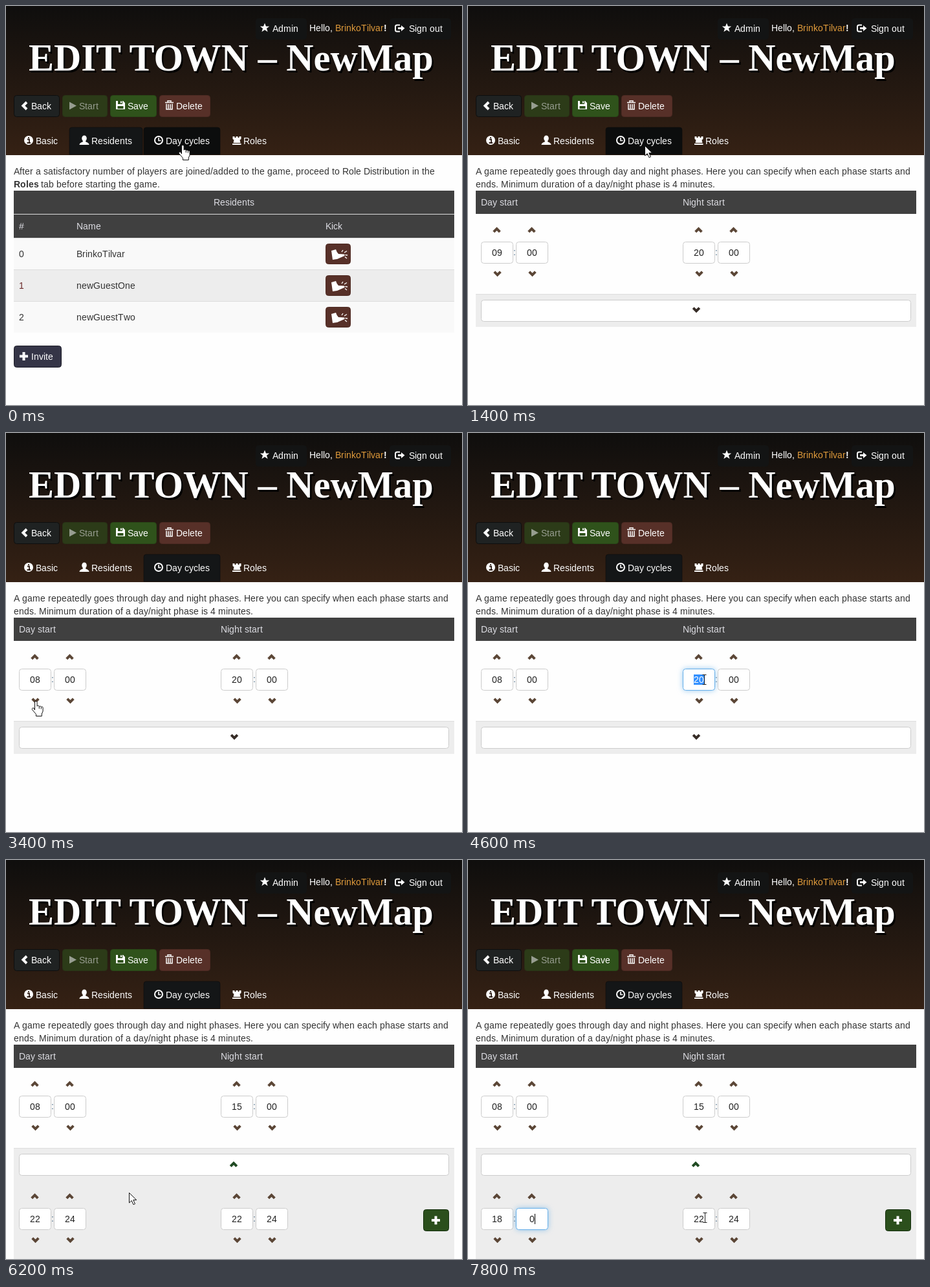
Write an HTML page that moves like this. It is 705 px wide and 618 px high and loops after 8000 ms.

```html
<!DOCTYPE html>
<html lang="en">
<head>
<meta charset="utf-8">
<title>Edit town</title>
<style>
  html, body { margin: 0; width: 100%; height: 100%; overflow: hidden; background: #fefefe; }
  svg { display: block; font: 14px "Liberation Sans", Arial, sans-serif; }
  .title { font: bold 58.5px "Liberation Serif", "Times New Roman", serif; }
  .focus { stroke: #66afe9; filter: drop-shadow(0 0 4px rgba(102, 175, 233, .65)); }
</style>
</head>
<body>
<svg id="stage" width="705" height="618" viewBox="0 0 705 618"></svg>
<script>
const LOOP = 8000, STEP = 200;
const stage = document.getElementById('stage');
const pen = document.createElement('canvas').getContext('2d');

// Text is laid out on whole-pixel advances.
const advance = (c, bold) => {
  pen.font = `${bold ? 'bold ' : ''}14px "Liberation Sans", Arial, sans-serif`;
  return Math.round(pen.measureText(c).width);
};
const textWidth = s => [...s].reduce((w, c) => w + advance(c), 0);

function text(x, y, s, fill = '#333', bold = false) {
  const xs = [...s].map(c => { const at = x; x += advance(c, bold); return at; });
  return `<text x="${xs.join(' ')}" y="${y}" fill="${fill}"${bold ? ' font-weight="bold"' : ''}>${s}</text>`;
}
const rect = (x, y, w, h, fill, more = '') =>
  `<rect x="${x}" y="${y}" width="${w}" height="${h}" fill="${fill}" ${more}/>`;
const button = (x, y, w, h, fill, stroke = fill) =>
  rect(x + .5, y + .5, w - 1, h - 1, fill, `rx="4" stroke="${stroke}"`);
const shape = (d, fill = '#fff', more = '') => `<path d="${d}" fill="${fill}" ${more}/>`;
const line = (d, stroke = '#fff', width = 2) =>
  `<path d="${d}" fill="none" stroke="${stroke}" stroke-width="${width}"/>`;
const at = (x, y, body) => `<g transform="translate(${x} ${y})">${body}</g>`;
const chevron = (x, y, dir, color) =>
  line(`M${x - 4.8} ${y + 2.4 * dir}l4.8 ${-4.8 * dir} 4.8 ${4.8 * dir}`, color, 4);
const plus = (x, y) => line(`M${x - 6.5} ${y}h13M${x} ${y - 6.5}v13`, '#fff', 4);

function tab(x, w, fill) {
  return shape(`M${x} 230v-38q0-4 4-4h${w - 8}q4 0 4 4v38z`, fill, 'stroke="#0b0b0b" stroke-width=".6"');
}

function title() {
  const s = 'EDIT TOWN – NewMap';
  return `<g class="title"><text x="37.5" y="102.5" fill="#000">${s}</text>
    <text x="35" y="100" fill="#fff">${s}</text></g>`;
}

function header(s) {
  const white = '#fff';
  return rect(0, 0, 705, 231, 'url(#sky)') + title()
    + button(386, 19, 79, 33, '#131414')
    + shape('M400 26.5l2 5h5.2l-4.2 3.3 1.6 5.2-4.6-3.1-4.6 3.1 1.6-5.2-4.2-3.3h5.2z')
    + text(412, 40, 'Admin', white)
    + text(469, 39, 'Hello,', white) + text(509, 39, 'BrinkoTilvar', '#df9a3b') + text(584, 39, '!', white, true)
    + button(593, 19, 95, 33, '#131414')
    + line('M609 29.5h-4.5q-2.5 0-2.5 2.5v5q0 2.5 2.5 2.5h4.5')
    + shape('M606 33h5v-3l5.5 4.5-5.5 4.5v-3h-5z')
    + text(623, 40, 'Sign out', white)

    + button(12, 138, 71, 34, '#1f2222', '#0d0e0e')
    + line('M32 149l-5.6 5.5 5.6 5.5', white, 4) + text(39, 160, 'Back', white)
    + button(87, 138, 70, 34, '#2c3b18', '#283416')
    + shape('M98 148.5l11 6-11 6z', '#979d90') + text(113, 160, 'Start', '#979d90')
    + button(161, 138, 72, 34, '#2f521b', '#284717')
    + shape('M170 147h11l3 3v10h-14zM173 147v5h7v-5zM172.5 155v4h9v-4z', white, 'fill-rule="evenodd"')
    + rect(177, 147.5, 2, 3, white) + text(188, 160, 'Save', white)
    + button(237, 138, 79, 34, '#573028', '#4d2a23')
    + line('M246 149.5h13M250 148.5v-1.5h5v1.5', white, 1.6)
    + line('M248 151.5v8.5h9v-8.5M251 152v7M254 152v7', white, 1.5) + text(263, 160, 'Delete', white)

    + (s.tab ? '' : tab(98, 113, '#141617')) + tab(213, 118, s.hover ? '#0c0d0d' : '#141617')
    + '<circle cx="35" cy="208" r="7" fill="#fff"/>'
    + line('M33 206.5h3v5M32.5 212h5.5M34 203.8h2', '#2c1c13', 1.8) + text(46, 214, 'Basic', white)
    + '<ellipse cx="121" cy="205" rx="3.8" ry="4.6" fill="#fff"/>'
    + shape('M113.5 215q0-3 5-4.5l1-3h3l1 3q5 1.500 5 4.500z') + text(132, 214, 'Residents', white)
    + '<circle cx="236" cy="208" r="6" fill="none" stroke="#fff" stroke-width="2"/>'
    + line('M236 204v4.500h3.500', white, 1.6) + text(247, 214, 'Day cycles', white)
    + shape('M350.500 202h3v2h2v-2h3v2h2v-2h3v4l-2 1.500 1 4.500h-11l1-4.500-2-1.500zM350 213h13.500v2h-13.500z')
    + text(367, 214, 'Roles', white);
}

const foot = shape('M9 11l7-2q1.500 5 4 7l9 .5q2 2.500-2 3.500l-9 4-7 1q-1-7-2-14z')
  + line('M25 13l2-3M29 14l4-2.500M30.500 17.500l3.500.5M30 20.500l3 2.500', '#fff', 1.3);

function residents() {
  const pale = '#dcdce2';
  const row = (name, i) => {
    const y = 359 + 49 * i;
    return rect(12, y, 681, 49, i % 2 ? '#ededed' : '#f9f9f9') + rect(12, y, 681, 1, '#ddd')
      + text(20, y + 30, String(i), i === 1 ? '#6b2a2a' : '#333') + text(109, y + 30, name)
      + button(494, y + 9, 39, 32, '#573028', '#4f2b24') + at(494, y + 9, foot);
  };
  return text(12, 261, 'After a satisfactory number of players are joined/added to the game, proceed to Role Distribution in the')
    + text(12, 281, 'Roles', '#333', true) + text(54, 281, 'tab before starting the game.')
    + rect(12, 286, 681, 73, '#404040') + rect(12, 322, 681, 1, '#ddd')
    + text(321, 309, 'Residents', pale)
    + text(20, 346, '#', pale) + text(109, 346, 'Name', pale) + text(494, 346, 'Kick', pale)
    + ['BrinkoTilvar', 'newGuestOne', 'newGuestTwo'].map(row).join('')
    + button(12, 526, 74, 34, '#353547', '#1d1d28') + plus(27.5, 542.5) + text(39, 548, 'Invite', '#fff');
}

function field(x, y, key, s) {
  const value = s[key], w = textWidth(value), left = Math.round(x + 25 - w / 2);
  const focused = s.focus === key, selected = focused && s.select;
  return chevron(x + 24.5, y - 17.5, 1, '#5b4636') + chevron(x + 25.5, y + 49, -1, '#5b4636')
    + rect(x + .5, y + .5, 49, 33, '#fff', `rx="4" stroke="#ccc" ${focused ? 'class="focus"' : ''}`)
    + (selected ? rect(left, y + 9, w, 16, '#3390ff') : '')
    + text(left, y + 22, value, selected ? '#fff' : '#222')
    + (focused && !selected ? rect(left + w, y + 9, 1, 16, '#000') : '');
}
const clock = (x, y, hour, minute, s) =>
  text(x + 50, y + 21, ':', '#4a6a85') + field(x, y, hour, s) + field(x + 54, y, minute, s);

function cycles(s) {
  return text(12, 261, 'A game repeatedly goes through day and night phases. Here you can specify when each phase starts and')
    + text(12, 281, 'ends. Minimum duration of a day/night phase is 4 minutes.')
    + rect(12, 286, 681, 36, '#404040') + text(20, 309, 'Day start', '#dcdce2') + text(332, 309, 'Night start', '#dcdce2')
    + clock(20, 365, 'day', 'dayMin', s) + clock(332, 365, 'night', 'nightMin', s)
    + rect(12, 446, 681, s.open ? 172 : 51, '#ededed') + rect(12, 446, 681, 1, '#ddd')
    + button(20, 455, 665, 34, '#fff', '#ccc')
    + (s.open
      ? chevron(352, 472, 1, '#1f4a22')
        + clock(20, 539, 'newDay', 'newDayMin', s) + clock(332, 539, 'newNight', 'newNightMin', s)
        + button(645, 541, 40, 34, '#2b4f1c', '#16300f') + plus(664.5, 558)
      : chevron(353, 470, -1, '#362c26'));
}

const scribble = line('M199 172Q275 166 352.500 165L351.500 248.500Q315 250 285 246.500Q240 241 201 247Q207 205 206 173', '#9c0b0b', 8.5);

const outline = 'stroke="#111" stroke-linejoin="round"';
const cursors = {
  arrow: shape('M.5.5v15.500l3.700-3.500 2.800 6.200 2.500-1.100-2.700-6h5z', '#fff', outline),
  hand: at(-6.5, 0, shape('M5 14V2.200a1.800 1.800 0 0 1 3.600 0v6a1.700 1.700 0 0 1 3.200.5a1.700 1.700 0 0 1 3 .8'
    + 'a1.600 1.600 0 0 1 2.800.8V16l-1.800 4v3.500H7v-3L1 13.500a1.800 1.800 0 0 1 2.600-2.300z', '#fff', outline)
    + line('M11.800 9v3M14.800 10v2.500', '#111', 1)),
  beam: line('M-2.500-7.500h6M.5-7.500v15M-2.500 7.500h6', '#222', 1),
};

// Each cue adds its changes to the state.
const cues = [
  [0, { tab: 0, hover: 1, cursor: 'hand', day: '09', dayMin: '00', night: '20', nightMin: '00',
        newDay: '22', newDayMin: '24', newNight: '22', newNightMin: '24' }],
  [400, { mark: 1 }],
  [1400, { mark: 0, tab: 1, cursor: 'arrow' }],
  [2000, { hover: 0 }],
  [3000, { cursor: 'hand' }],
  [3200, { day: '08' }],
  [3600, { cursor: 'arrow' }],
  [4000, { cursor: 'beam' }],
  [4400, { focus: 'night', select: 1 }],
  [4800, { night: '1', select: 0 }],
  [5000, { night: '15' }],
  [5400, { cursor: 'arrow' }],
  [6000, { cursor: 'hand', focus: '' }],
  [6200, { cursor: 'arrow', open: 1 }],
  [6400, { cursor: 'beam', focus: 'newDay', select: 1 }],
  [6800, { newDay: '1', select: 0 }],
  [7000, { newDay: '18' }],
  [7200, { cursor: 'arrow', focus: 'newDayMin', select: 1 }],
  [7600, { cursor: 'beam' }],
  [7800, { newDayMin: '0', select: 0 }],
];
const route = [
  [0, 273, 215], [1200, 273, 215], [1400, 273, 216], [1800, 273, 216], [3000, 49, 413], [3200, 46, 415],
  [3400, 46, 415], [4200, 365, 382], [5000, 365, 382], [5400, 467, 362], [5600, 480, 363], [5800, 480, 363],
  [6000, 354, 470], [6200, 190, 515], [6400, 24, 556], [7000, 24, 556], [7600, 366, 554], [8000, 366, 554],
];

function pointer(t) {
  const i = route.findIndex(p => p[0] > t);
  const [t0, x0, y0] = route[i - 1], [t1, x1, y1] = route[i];
  const k = (1 - Math.cos(Math.PI * (t - t0) / (t1 - t0))) / 2;
  return [Math.round(x0 + (x1 - x0) * k), Math.round(y0 + (y1 - y0) * k)];
}

function scene(t) {
  const s = Object.assign({}, ...cues.filter(c => c[0] <= t).map(c => c[1]));
  return '<defs><linearGradient id="sky" x2="0" y2="1"><stop stop-color="#0f0e0d"/>'
    + '<stop offset="1" stop-color="#352114"/></linearGradient></defs>'
    + header(s) + (s.tab ? cycles(s) : residents())
    + at(...pointer(t), cursors[s.cursor]) + (s.mark ? scribble : '');
}

const start = performance.now();
let shown = -1;
function tick() {
  const t = Math.floor((performance.now() - start) % LOOP / STEP) * STEP;
  if (t !== shown) stage.innerHTML = scene(shown = t);
  requestAnimationFrame(tick);
}
tick();
</script>
</body>
</html>
```
